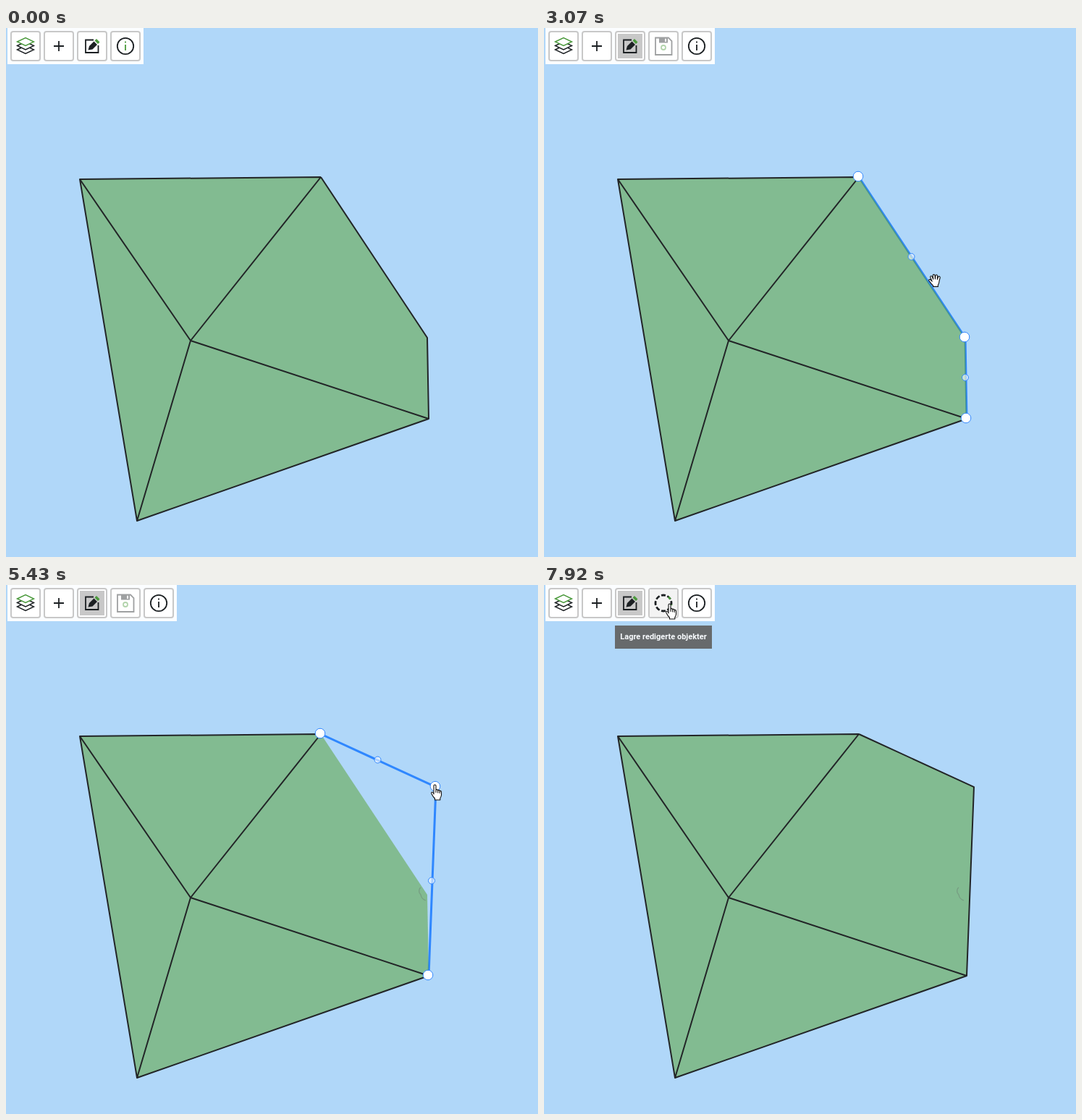
These frames come from a looping animation (735 by 731 pixels, 7990 ms). An HTML page:

```html
<!DOCTYPE html>
<html lang="no">
<head>
<meta charset="utf-8">
<title>Rediger objekt</title>
<style>
  html, body { margin: 0; width: 100%; height: 100%; overflow: hidden; background: #b0d7f9; }
  svg { display: block; width: 735px; height: 731px; }
  .edge { fill: none; stroke: #222527; stroke-width: 2; stroke-linejoin: round; }
  .btn { fill: #fff; stroke: #c8c8c8; stroke-width: 2; }
  .ink { fill: none; stroke: #1b1f22; stroke-width: 1.8; }
  .layer { fill: #fff; stroke: #1b1f22; stroke-width: 1.4; }
  .green { stroke: #4b9a3c; }
  .handle { fill: #fff; stroke: #3388ff; }
  .cursor { fill: #fff; stroke: #111; stroke-width: 1.1; stroke-linejoin: round; stroke-linecap: round; }
  text { font: bold 11px Roboto, sans-serif; fill: #fff; text-anchor: middle; }
</style>
</head>
<body>
<svg viewBox="0 0 735 731">
  <defs>
    <rect id="box" class="btn" y="5" width="40" height="40" rx="3"/>
    <path id="tile" d="M-11.5 0L0 -5.5L11.500 0L0 5.500Z"/>
  </defs>

  <path id="line" fill="none" stroke="#2f87ff" stroke-width="3" stroke-linejoin="round"/>
  <path id="land" fill="#569f2b" fill-opacity=".5"/>
  <path id="smudge" d="M573 418Q570 420 571 425L573 428Q574 434 580 436" fill="none" stroke="#779d82" stroke-width="1.3"/>
  <path class="edge" d="M435 206L102 209L181 681L584 540L255 432L435 206M102 209L255 432L181 681"/>
  <path class="edge" id="side"/>
  <g id="handles">
    <circle class="handle" id="midA" r="4.5" fill-opacity=".6"/>
    <circle class="handle" id="midB" r="4.5" fill-opacity=".6"/>
    <circle class="handle" r="6.8" cx="434" cy="205"/>
    <circle class="handle" id="corner" r="6.8"/>
    <circle class="handle" r="6.8" cx="583" cy="539"/>
  </g>

  <rect id="bar" x="2" height="50" fill="#fff" fill-opacity=".95"/>
  <use href="#box" x="7"/>
  <use href="#tile" class="layer" x="27" y="30"/>
  <use href="#tile" class="layer" x="27" y="24.500"/>
  <use href="#tile" class="layer green" x="27" y="19"/>
  <use href="#box" x="53"/>
  <path class="ink" d="M66 25H80M73 18V32"/>
  <use href="#box" x="99"/>
  <rect id="active" x="102" y="8" width="34" height="34" fill="#c8c8c8"/>
  <path class="ink" d="M121 16.500H110V34H127.500V24"/>
  <path d="M113.500 30.500L115 25L121.500 18.500L126 23L119.500 29.500Z" fill="#1b1f22"/>
  <path d="M122.500 17.500L125 15L129.500 19.500L127 22Z" fill="#4b9a3c"/>
  <g id="save">
    <use href="#box" x="145"/>
    <rect id="hover" x="146" y="6" width="38" height="38" fill="#f3f3f3"/>
    <g id="disk">
      <path class="ink" d="M154 13.500H172L176.500 18V37H154Z"/>
      <path d="M159 13H171V20.500H159ZM167 14.500V19H169V14.500Z" fill="#1b1f22" fill-rule="evenodd"/>
      <circle class="ink green" cx="165" cy="27" r="3"/>
    </g>
    <g id="spinner" fill="none" stroke-width="2.8">
      <circle cx="165" cy="25" r="11" stroke="#1b1f22" pathLength="80" stroke-dasharray="7 3" stroke-dashoffset="3.5"/>
      <path d="M172 16.500A11 11 0 0 1 174.500 19.500M175.900 27A11 11 0 0 1 175.700 28" stroke="#4b9a3c"/>
    </g>
  </g>
  <g id="info">
    <use href="#box" x="145"/>
    <circle class="ink" cx="165" cy="25" r="11.200"/>
    <path class="ink" id="letter" d="M165 18.500V20.500M165 23V31"/>
  </g>

  <g id="tipEdit"><rect x="75" y="56" width="86.500" height="31.500" fill="#616161"/><text x="118.500" y="75">Rediger objekt</text></g>
  <g id="tipSave"><rect x="98" y="56" width="134" height="32" fill="#616161"/><text x="165" y="75">Lagre redigerte objekter</text></g>

  <path class="cursor" id="open" d="M5.200 10.200L3 5Q2.200 3.200 3.600 2.800Q4.900 2.500 5.500 4L6.800 7.200L6.200 2.200Q6.200.6 7.500.6Q8.800.6 9 2.200L9.500 7L10 2Q10.200.9 11.400 1Q12.700 1.200 12.600 2.700L12.400 7.400L13.600 4Q14.200 2.800 15.300 3.200Q16.500 3.600 16.200 5Q15 9.500 14.800 11.500Q14.500 13.500 13.400 15V17.400H6.600V16Q4.200 14 2.800 11.600L.9 9.300Q.2 8.200 1.200 7.500Q2.400 7 3.400 8.200Z"/>
  <path class="cursor" id="closed" d="M4 7L3.400 4Q3.600 2.600 5 3Q5.500 1.400 7.200 2Q8.800.9 9.800 2.200Q11.600 1.600 12.200 3Q14.400 2.600 14.400 5Q14.400 8.500 13.400 10.500L13 13.600H5Q4.600 11.800 2.600 10Q.4 7.600 1.600 6.800Q2.800 6 4 7ZM6.500 4V5.500M9.300 4V5.500M11.800 4.500V6"/>
  <path class="cursor" id="point" d="M4 14V2.600Q4 1 5.500 1Q7 1 7 2.600V8Q8.600 7 9.700 8.600Q11.200 7.900 12.200 9.400Q14.500 9 14.500 11.500V15.500Q14 18 12.800 19.500V22H5.500V20Q3 17.500.9 13.400Q.2 11.800 1.500 11.300Q2.600 11 4 13.500ZM7 8V11.500M9.700 9V12M12.200 10V12.500"/>
  <circle id="press" r="12" fill="#ebeb3c" fill-opacity=".65"/>
</svg>
<script>
const LOOP = 7990, STEP = 70;
const GRAB = 4340, DROP = 5360, UPDATE = 6370, SAVE = 7920;

// Pointer moves: start, end, key points evenly spread over that time
const moves = [
  [390, 1150, [716, 715], [520, 215], [262, 146], [151, 75]],
  [1220, 1430, [128, 44], [119, 26]],
  [1840, 1980, [119, 26], [357, 162], [511, 281]],
  [2060, 2260, [541, 332], [523, 335]],
  [3070, 3670, [539, 344], [590, 435], [581, 425]],
  [GRAB, 5100, [581, 426], [586, 318], [591, 279], [591, 277]],
  [7030, 7720, [565, 270], [370, 160], [190, 40], [172, 27]]
];
const drag = moves[5];

const el = id => document.getElementById(id);
const show = (id, on) => { el(id).style.display = on ? "" : "none"; };
const shift = (id, x, y) => el(id).setAttribute("transform", `translate(${x} ${y})`);
const within = (t, a, b) => t >= a && t < b;
const ramp = (t, a, b) => Math.max(0, Math.min(1, (t - a) / (b - a)));

// The pointer is sampled in even steps; lag is measured in steps
function along([a, b, ...keys], t, lag = 0) {
  const steps = Math.round((b - a) / STEP);
  const k = Math.floor(ramp(t + 2, a, b) * steps);
  const u = Math.max(0, (k - lag) / steps) * (keys.length - 1);
  const i = Math.min(Math.floor(u), keys.length - 2);
  return keys[i].map((v, axis) => v + (keys[i + 1][axis] - v) * (u - i));
}

function drawMap(t) {
  const pull = (426 - along(drag, t, .3)[1]) / 149;
  const x = 581 + 12 * pull, y = 427 - 149 * pull;
  const far = t < UPDATE ? "582 428" : "594 279";
  const side = `M435 206L${x + 1} ${y + 1}L584 540`;
  const selected = within(t, 2800, SAVE);

  el("land").setAttribute("d", `M102 209L435 206L${far}L584 540L181 681Z`);
  el("line").setAttribute("d", side);
  el("side").setAttribute("d", side);
  show("line", selected);
  show("side", !selected);
  show("handles", selected);
  show("smudge", t >= GRAB + STEP);
  shift("corner", x, y);
  shift("midA", (434 + x) / 2, (205 + y) / 2);
  shift("midB", (583 + x) / 2, (539 + y) / 2);
}

function drawBar(t) {
  const editing = t >= 1496;
  el("bar").setAttribute("width", editing ? 234 : 188);
  show("active", editing);
  show("save", editing);
  show("hover", t >= 7650);
  show("disk", t < SAVE);
  show("spinner", t >= SAVE);
  el("disk").style.opacity = t < UPDATE ? .42 : 1;
  shift("info", editing ? 46 : 0, 0);
  el("letter").classList.toggle("green", !editing);
  el("tipEdit").style.opacity = .92 * Math.min(ramp(t, 1290, 1430), 1 - ramp(t, 1840, 1980));
  el("tipSave").style.opacity = .92 * ramp(t, 7580, 7720);
}

function drawCursor(t) {
  const move = moves.filter(m => t >= m[0]).pop();
  const [x, y] = along(move || moves[0], t);
  const grab = within(t, GRAB, DROP + STEP);
  const overShape = within(t, 2460, 3070) || within(t, 4000, GRAB) || within(t, DROP + STEP, 7030);
  const kind = !move ? "" : grab ? "closed" : overShape || y < 48 ? "point" : "open";

  for (const id of ["open", "closed", "point"]) show(id, id === kind);
  shift("open", x - 8, y - 4);
  shift("closed", x - 7.5, y - 6);
  shift("point", x - 4, y - 2);
  shift("press", x, y);
  show("press", within(t, 1427, 1565) || within(t, 2730, 3070) || within(t, GRAB, DROP));
}

const start = performance.now();
function frame() {
  const t = (performance.now() - start) % LOOP;
  drawMap(t);
  drawBar(t);
  drawCursor(t);
  requestAnimationFrame(frame);
}
frame();
</script>
</body>
</html>
```
